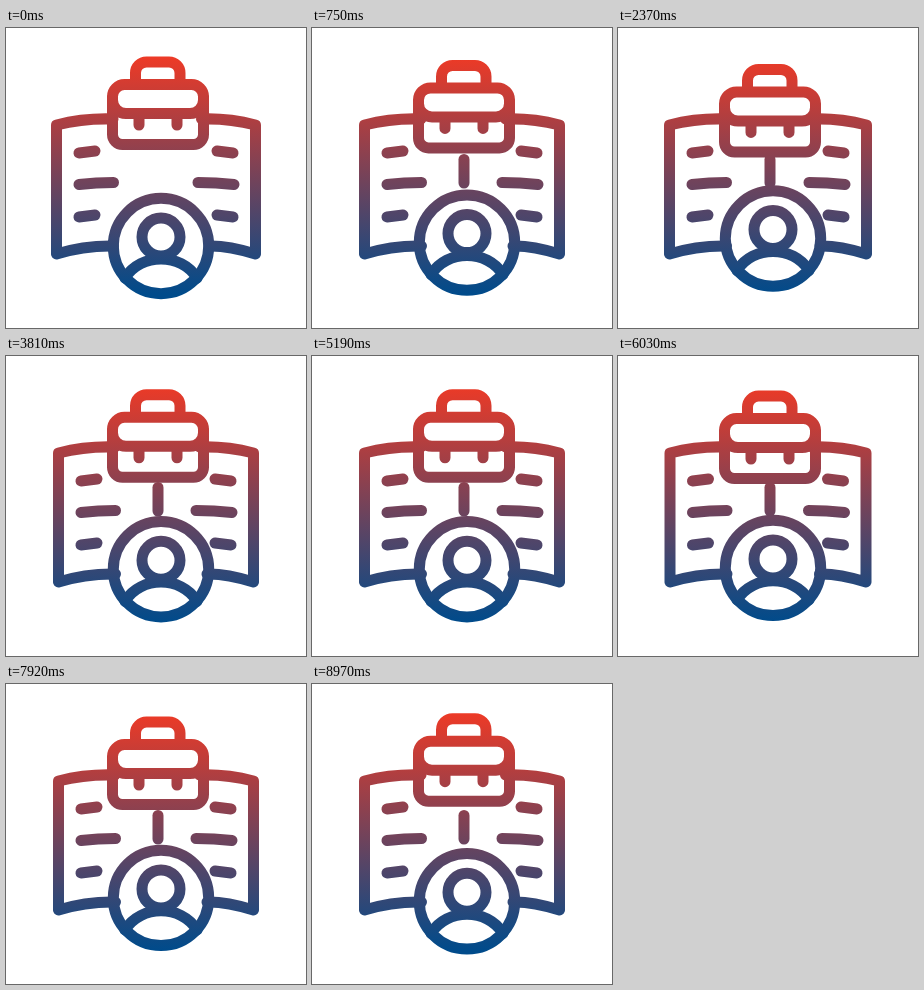
Write an HTML page that moves like this. It is 300 by 300 pixels and loops after 9 s.

```html
<!DOCTYPE html>
<html lang="en">
<head>
<meta charset="utf-8">
<title>Portfolio icon</title>
<style>
  html, body { margin: 0; width: 100%; height: 100%; overflow: hidden; background: #fff; }
  svg { display: block; width: 100vw; height: 100vh; }
  mask g { fill: none; stroke: #fff; stroke-width: 11; stroke-linecap: round; stroke-linejoin: round; }
</style>
</head>
<body>
<svg viewBox="0 0 300 300">
  <defs>
    <linearGradient id="tint" gradientUnits="userSpaceOnUse" x1="0" y1="28" x2="0" y2="266">
      <stop offset="0" stop-color="#ee3a26"/>
      <stop offset="1" stop-color="#004b8b"/>
    </linearGradient>
    <mask id="icon" maskUnits="userSpaceOnUse" x="0" y="0" width="300" height="300">
      <g id="left">
        <path d="M107.5 218Q78 217.5 50.5 226V97Q78 90 107 91"/>
        <path d="M73 125L89 123M73 156.5Q90 154.5 107.5 154.5M73 189L89 187"/>
      </g>
      <g id="right">
        <path d="M203 218Q222 217.5 249.5 226V97Q222 90 195.5 91"/>
        <path d="M211 123L227 125M192 154.5Q210 154.5 228 156.5M211 187L227 189"/>
      </g>
      <g id="link"><path d="M152 131.5V155"/></g>
      <g id="bag">
        <path d="M129.5 55V45a11 11 0 0 1 11-11H163a11 11 0 0 1 11 11V55"/>
        <path d="M118.5 56.5H185.5a12 12 0 0 1 12 12V72a13.5 13.5 0 0 1-13.5 13.5H120a13.5 13.5 0 0 1-13.5-13.5V68.5a12 12 0 0 1 12-12Z"/>
        <path d="M106.5 70V106.5a10 10 0 0 0 10 10H187.5a10 10 0 0 0 10-10V70M133 86V97M171 86V97"/>
      </g>
      <g id="person">
        <circle cx="155" cy="218" r="47.7"/>
        <circle cx="155" cy="209" r="19"/>
        <path d="M119 250C135 224.500 175 224.500 191 250"/>
      </g>
    </mask>
  </defs>
  <rect width="300" height="300" fill="url(#tint)" mask="url(#icon)"/>
</svg>
<script>
  const STEP = 30, STEPS = 30, HALF = STEPS / 2;
  const TRAVEL = 10.2, INSET = 2;
  const part = id => document.getElementById(id);
  const [left, right, link, bag, person] = ["left", "right", "link", "bag", "person"].map(part);
  const move = (el, x, y) => el.setAttribute("transform", `translate(${x} ${y})`);

  function draw(time) {
    const step = Math.floor(time / STEP) % STEPS;
    const near = Math.min(step, STEPS - step);
    const shift = TRAVEL * near / HALF;
    // Pages snap inward after the rest pose, then ease back out.
    const inset = near ? Math.min(INSET, INSET * (HALF - near) / 8) : 0;
    move(bag, 0, shift);
    move(person, 0, -shift);
    move(left, inset, 0);
    move(right, -inset, 0);
    link.setAttribute("visibility", near ? "visible" : "hidden");
  }

  let start;
  function tick(now) {
    start ??= now;
    draw(now - start);
    requestAnimationFrame(tick);
  }
  draw(0);
  requestAnimationFrame(tick);
</script>
</body>
</html>
```
